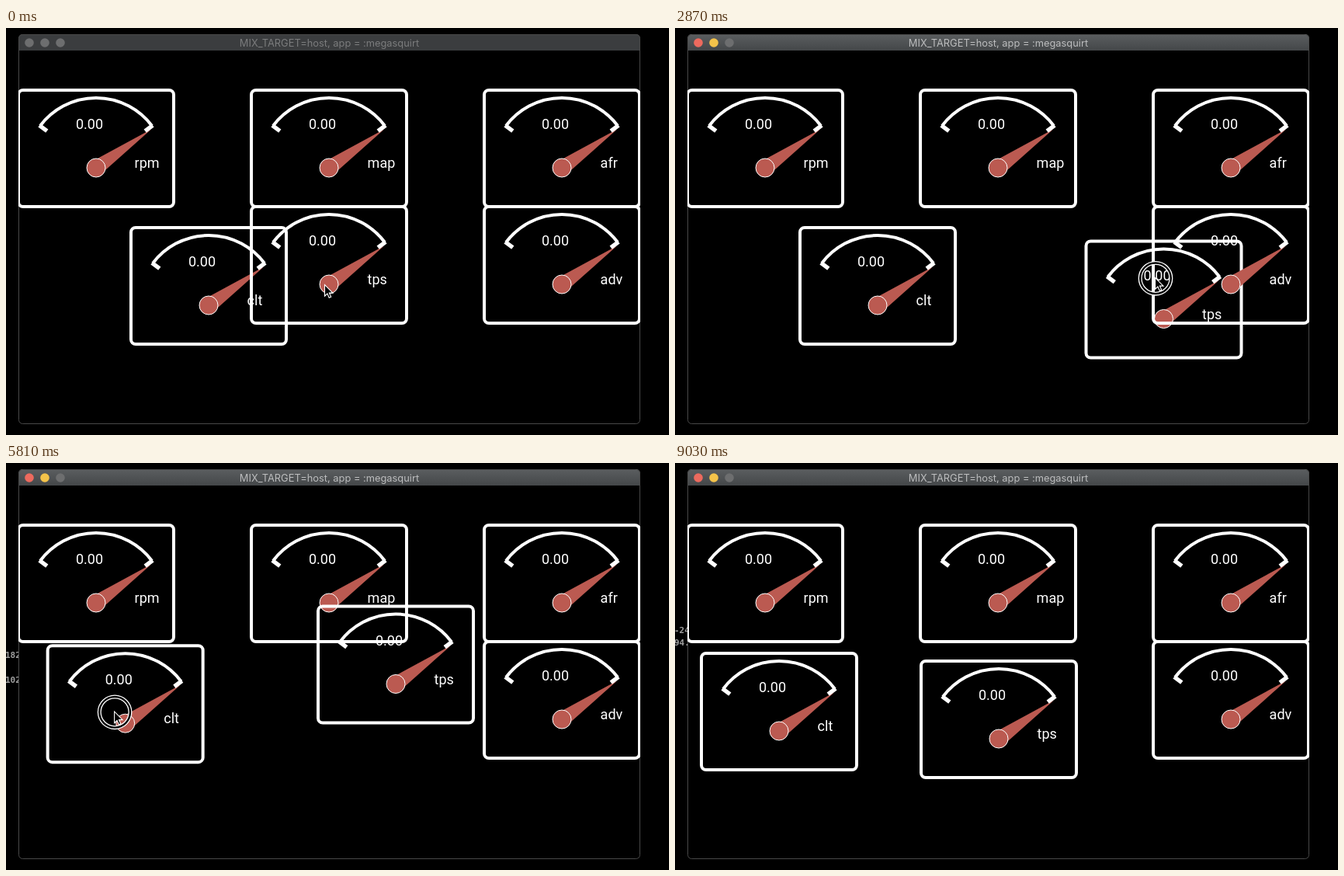
Animation, 854 px wide and 524 px high, one loop 9.1 s. Source, as an HTML page:

```html
<!DOCTYPE html>
<html lang="en">
<head>
<meta charset="utf-8">
<title>Gauges</title>
<style>
  html, body { margin: 0; width: 100%; height: 100%; overflow: hidden; background: #000; }
  svg { display: block; width: 854px; height: 524px; }
  .gauge text { font: 18px Roboto, sans-serif; fill: #fff; }
  #title { font: 12.85px Inter, sans-serif; text-anchor: middle; }
  #log text { font: bold 11px "DejaVu Sans Mono", monospace; fill: #a0a0a0; }
</style>
</head>
<body>
<svg viewBox="0 0 854 524">
  <defs>
    <linearGradient id="bar" x2="0" y2="1">
      <stop offset="0" stop-color="#5b5e60"/>
      <stop offset="1" stop-color="#444749"/>
    </linearGradient>
    <clipPath id="win"><rect x="16" y="29" width="801" height="481"/></clipPath>
    <clipPath id="margin"><rect width="16" height="524"/></clipPath>
    <g id="dial" fill="none" stroke="#fff">
      <rect width="200" height="150" rx="6" stroke-width="4"/>
      <path d="M94.5 92 L171 50.5 L106 108.2Z" fill="#bb5a51" stroke="none"/>
      <path d="M28 46 A90 90 0 0 1 172 46" stroke-width="4"/>
      <path d="M27 45.3 L36.8 52.6 M173 45.3 L163.2 52.6" stroke-width="5.4"/>
      <circle cx="100" cy="100" r="12" fill="#bb5a51"/>
    </g>
  </defs>
  <rect width="854" height="524"/>
  <g id="log" clip-path="url(#margin)"></g>
  <path id="titlebar" d="M16 29 V13 a5 5 0 0 1 5 -5 H812 a5 5 0 0 1 5 5 V29Z"/>
  <path id="shine" d="M20 8.5 H813" stroke="#7b7d7f"/>
  <rect x="16.5" y="8.5" width="800" height="501" rx="5" fill="none" stroke="#484848"/>
  <g id="lights">
    <circle cx="30" cy="19" r="5.8"/>
    <circle cx="50" cy="19" r="5.8"/>
    <circle cx="70" cy="19" r="5.8"/>
  </g>
  <text id="title" x="416.5" y="24">MIX_TARGET=host, app = :megasquirt</text>
  <g id="gauges" clip-path="url(#win)"></g>
  <g id="pointer">
    <g id="ring" fill="none" transform="translate(1 1.3)">
      <circle r="19.7" stroke="#000" stroke-width="4"/>
      <circle r="21.7" stroke="#fff" stroke-width="1.3"/>
      <circle r="18" stroke="#fff" stroke-width="1.3"/>
    </g>
    <path d="M.5 .5 V15.2 L3.9 12 L6.2 17.3 L8.7 16.2 L6.4 11.1 H11Z" fill="#000" stroke="#fff" stroke-width="1.1"/>
  </g>
</svg>
<script>
const LOOP = 9100, STEP = 70, LAG = 70, FOCUS = 700;
const $ = id => document.getElementById(id);

// Pointer way points: time, x, y and how long it rests there.
const route = [
  [0, 410, 330], [FOCUS, 412, 319.5], [1050, 477.5, 345.5], [1120, 499, 344],
  [1700, 600, 395], [2660, 640, 387], [2800, 625.5, 364], [2870, 618, 321],
  [3400, 540, 399], [3710, 498, 274, 390], [4830, 251.6, 339, 140], [5110, 215, 310],
  [5180, 200, 304], [6200, 124.6, 327, 200], [6860, 496, 289, 280], [8500, 411, 359.5, 180],
  [8960, 430, 530]
].flatMap(([t, x, y, rest]) => rest ? [[t, x, y], [t + rest, x, y]] : [[t, x, y]]);

const drags = [
  { id: "tps", from: FOCUS, to: 3920 },
  { id: "clt", from: 4970, to: 6300 },
  { id: "tps", from: 7140, to: 8650 }
];

const logs = [
  { from: 1050, to: 2030, y: [475, 491], text: ["252", "96."] },
  { from: 5600, to: 7910, y: [251, 283], text: ["182", "102"] },
  { from: 7910, to: LOOP, y: [219, 235], text: ["-24", "94."] }
];

const gauges = ["rpm", "map", "afr", "clt", "tps", "adv"].map((id, i) =>
  ({ id, x: 16 + 300 * (i % 3), y: i < 3 ? 80 : 230 }));
Object.assign(gauges[3], { x: 161, y: 257 });

const clamp = (v, lo, hi) => Math.min(hi, Math.max(lo, v));
const slope = (a, b, c) => (b[c] - a[c]) / (b[0] - a[0]);

// Tangent that never overshoots a way point.
function tangent(i, c) {
  if (i === 0 || i === route.length - 1) return 0;
  const a = slope(route[i - 1], route[i], c), b = slope(route[i], route[i + 1], c);
  return a * b <= 0 ? 0 : 2 * a * b / (a + b);
}

function pointer(t) {
  const i = clamp(route.findIndex(k => k[0] > t), 0, route.length) - 1;
  if (i < 0) return route[route.length - 1].slice(1);
  const p = route[i], q = route[i + 1], d = q[0] - p[0], u = (t - p[0]) / d;
  return [1, 2].map(c =>
    p[c] + (q[c] - p[c]) * u * u * (3 - 2 * u)
      + d * u * (1 - u) * ((1 - u) * tangent(i, c) - u * tangent(i + 1, c)));
}

// A gauge follows the pointer, slightly late, during each of its drags.
function place({ id, x, y }, t) {
  for (const { from, to } of drags.filter(d => d.id === id)) {
    const [x0, y0] = pointer(from), [x1, y1] = pointer(clamp(t - LAG, from, to));
    x += x1 - x0;
    y += y1 - y0;
  }
  return [x, y];
}

const move = (el, [x, y]) => el.setAttribute("transform", `translate(${x.toFixed(2)} ${y.toFixed(2)})`);
const show = (el, on) => { el.style.display = on ? "" : "none"; };
const during = (t, { from, to }) => t >= from && t < to;

$("gauges").innerHTML = gauges.map(({ id }) =>
  `<g class="gauge" id="${id}"><use href="#dial"/>
   <text x="74" y="50">0.00</text><text x="149.6" y="100">${id}</text></g>`).join("");
$("log").innerHTML = logs.map(({ y, text }) =>
  `<g>${text.map((s, i) => `<text x="-1" y="${y[i]}">${s}</text>`).join("")}</g>`).join("");

function draw(t) {
  const active = t >= FOCUS, gray = "#6d6e6f";
  $("titlebar").setAttribute("fill", active ? "url(#bar)" : "#3b3d3f");
  $("title").setAttribute("fill", active ? "#bcbdbe" : "#7b7c7d");
  show($("shine"), active);
  ["#ed6a5e", "#f4c34a", gray].forEach((c, i) =>
    $("lights").children[i].setAttribute("fill", active ? c : gray));
  gauges.forEach(g => move($(g.id), place(g, t)));
  move($("pointer"), pointer(t));
  show($("ring"), drags.some(d => during(t, d)));
  logs.forEach((l, i) => show($("log").children[i], during(t, l)));
}

const start = performance.now();
function tick() {
  const t = (performance.now() - start) % LOOP;
  draw(Math.floor(t / STEP) * STEP);
  requestAnimationFrame(tick);
}
draw(0);
requestAnimationFrame(tick);
</script>
</body>
</html>
```
